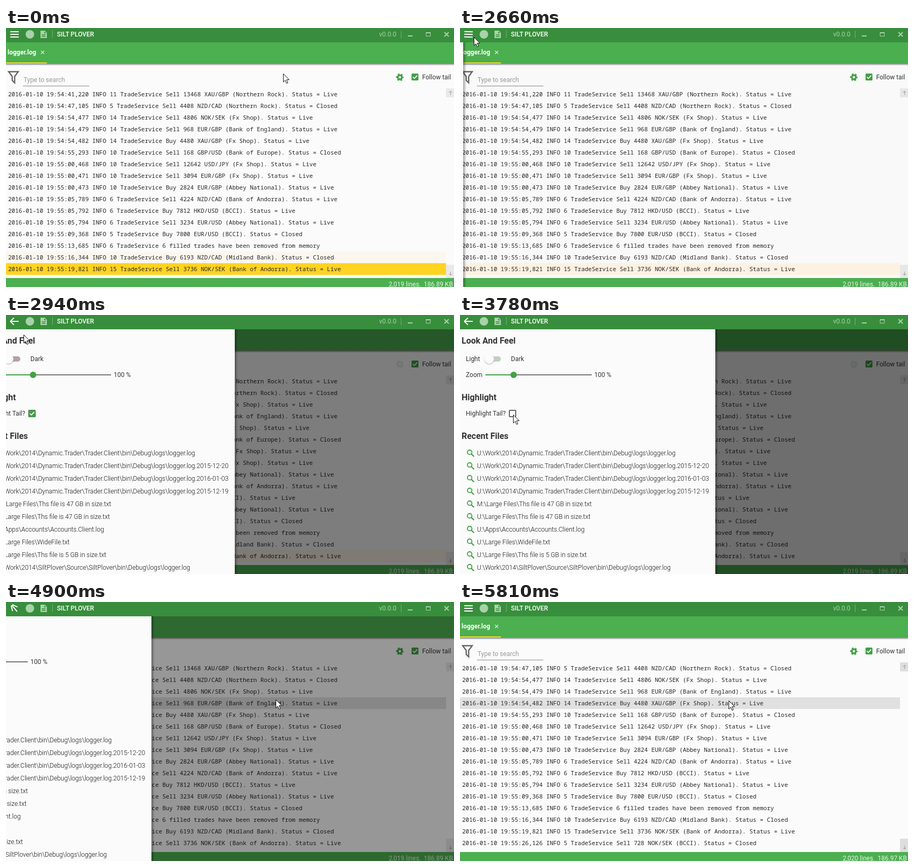
Recreate the animation shown at these times as an HTML page. Size 844 px wide and 489 px high, loop 8000 ms.

```html
<!DOCTYPE html>
<html lang="en">
<head>
<meta charset="utf-8">
<title>Log viewer</title>
<style>
  html, body { margin: 0; width: 100%; height: 100%; overflow: hidden; background: #fafbfa; }
  svg { display: block; width: 844px; height: 489px; }
  text { font: 12px Roboto, sans-serif; fill: #333; white-space: pre; }
  .log text { font: 11px "Noto Sans Mono", monospace; fill: #262626; }
  .head { font-weight: 700; font-size: 16px; }
  .file { font-weight: 300; fill: #111; }
  .pale { fill: #a8d3aa; }
  .line { fill: none; stroke: #a8d3aa; stroke-width: 2; }
</style>
</head>
<body>
<svg viewBox="0 0 844 489">
  <defs>
    <linearGradient id="down" x2="0" y2="1">
      <stop stop-opacity=".5"/><stop offset="1" stop-opacity="0"/>
    </linearGradient>
    <linearGradient id="side">
      <stop stop-opacity=".35"/><stop offset="1" stop-opacity="0"/>
    </linearGradient>
    <g id="tick">
      <rect width="13" height="13" rx="1.5" fill="#43a047"/>
      <path d="M2.5 6.5L5.3 9.3L10.7 3.7" fill="none" stroke="#fff" stroke-width="1.7"/>
    </g>
    <g id="lens" fill="none" stroke="#43a047">
      <circle cx="-1.8" cy="-1.8" r="4.2" stroke-width="1.8"/>
      <path d="M1.5 1.5L6.3 6.3" stroke-width="2.3"/>
    </g>
  </defs>

  <rect width="844" height="489" fill="#fafbfa"/>
  <rect y="27" width="844" height="40" fill="#4caf50"/>
  <rect y="67" width="844" height="4" fill="url(#down)"/>
  <rect y="65" width="77" height="2" fill="#ffd92e"/>
  <text x="3" y="50" style="font-weight:700;fill:#fff">logger.log</text>
  <path d="M66 43L72 49M72 43L66 49" stroke="#d6edd7" stroke-width="1.4"/>

  <path d="M5 82.5H23L16.3 91.5V103.5L11.7 99V91.5Z" fill="none" stroke="#666" stroke-width="2.4"/>
  <text x="33" y="102" style="fill:#999">Type to search</text>
  <path d="M32 109.5H157" stroke="#888"/>
  <g id="gear" transform="translate(742 93)" fill="none" stroke="#43a047">
    <circle r="3.9" stroke-width="3.2"/>
    <circle r="6" stroke-width="2.4" stroke-dasharray="3.1416" stroke-dashoffset="1.57"/>
  </g>
  <use href="#tick" x="764" y="86"/>
  <text x="784" y="97">Follow tail</text>

  <rect id="older" y="422" width="829" height="22"/>
  <rect id="tail" y="444" width="829" height="22"/>
  <rect id="hover" y="180" width="829" height="22" fill="#e0e0e0"/>
  <g class="log" id="log"></g>

  <g id="bar" fill="#e9e9e9">
    <path d="M829 114h15v17h-15zM829 447h15v25h-15z"/>
    <path d="M837.5 126.500V119M834.500 122L837.500 119L840.500 122M837.500 460V467M834.500 464L837.500 467L840.500 464" fill="none" stroke="#9a9a9a"/>
  </g>
  <rect y="472" width="844" height="17" fill="#4caf50"/>
  <text id="lines" x="721" y="488" style="fill:#e8f5e9"></text>
  <text id="size" x="787" y="488" style="fill:#e8f5e9"></text>

  <rect id="scrim" y="27" width="844" height="462"/>
  <g id="drawer">
    <rect x="481" y="27" width="6" height="462" fill="url(#side)"/>
    <rect y="27" width="481" height="462" fill="#fafbfa"/>
    <text class="head" x="3" y="54">Look And Feel</text>
    <text x="11" y="87">Light</text>
    <rect id="track" x="46" y="78" width="31" height="10" rx="5"/>
    <circle cx="55" cy="84" r="9.500" fill="#000" opacity=".2"/>
    <circle cx="55" cy="83" r="9" fill="#fcfcfc"/>
    <text x="96" y="87">Dark</text>
    <text x="11" y="117">Zoom</text>
    <path d="M101 113H248" stroke="#777" stroke-width="2"/>
    <path d="M48 113H101" stroke="#43a047" stroke-width="2"/>
    <circle cx="101" cy="113" r="6" fill="#43a047"/>
    <text x="253" y="117">100 %</text>
    <text class="head" x="3" y="161">Highlight</text>
    <text x="11" y="190">Highlight Tail?</text>
    <rect x="93" y="180" width="12" height="12" rx="1" fill="none" stroke="#666" stroke-width="2"/>
    <use id="checked" href="#tick" x="92.500" y="179.500"/>
    <text class="head" x="3" y="234">Recent Files</text>
    <g id="files"></g>
  </g>

  <rect width="844" height="27" fill="#388e3c"/>
  <g id="burger" fill="none" stroke="#fff" stroke-width="2">
    <path d="M-8 0H8"/><path id="upper"/><path id="lower"/>
  </g>
  <circle class="pale" cx="45" cy="12" r="8"/>
  <path class="pale" fill-rule="evenodd" d="M65 5H73L77 9V19H65ZM72 6.500V10H76ZM67.500 12V13.500H74.500V12ZM67.500 15V16.500H74.500V15Z"/>
  <path d="M87.500 4V19M744.500 5V19" stroke="#73b276"/>
  <text x="96" y="16" style="font-weight:500;fill:#fff">SILT PLOVER</text>
  <text class="pale" x="703" y="16">v0.0.0</text>
  <path class="line" d="M757 15H766M791 9H800M826 8L834 16M834 8L826 16"/>
  <path class="line" d="M791.500 8.500H799.500V15.500H791.500Z" style="stroke-width:1"/>
  <path id="cursor" d="M.5 .5V16L4 12.700L6.500 18.500L9 17.500L6.500 11.700H11.500Z" fill="#fff" stroke="#111"/>
</svg>
<script>
const $ = id => document.getElementById(id);
const set = (id, attrs) => { for (const k in attrs) $(id).setAttribute(k, attrs[k]); };

const LOOP = 8000, STEP = 70;
const OPEN = 2657, CLOSE = 4787, SLIDE = 400, UNCHECK = 3780, APPEND = 5600;

const rows = `19:54:41,220 INFO 11 TradeService Sell 13468 XAU/GBP (Northern Rock). Status = Live
19:54:47,105 INFO 5 TradeService Sell 4408 NZD/CAD (Northern Rock). Status = Closed
19:54:54,477 INFO 14 TradeService Sell 4806 NOK/SEK (Fx Shop). Status = Live
19:54:54,479 INFO 14 TradeService Sell 968 EUR/GBP (Bank of England). Status = Live
19:54:54,482 INFO 14 TradeService Buy 4480 XAU/GBP (Fx Shop). Status = Live
19:54:55,293 INFO 10 TradeService Sell 168 GBP/USD (Bank of Europe). Status = Closed
19:55:00,468 INFO 10 TradeService Sell 12642 USD/JPY (Fx Shop). Status = Live
19:55:00,471 INFO 10 TradeService Sell 3094 EUR/GBP (Fx Shop). Status = Live
19:55:00,473 INFO 10 TradeService Buy 2824 EUR/GBP (Abbey National). Status = Live
19:55:05,789 INFO 6 TradeService Sell 4224 NZD/CAD (Bank of Andorra). Status = Live
19:55:05,792 INFO 6 TradeService Buy 7812 HKD/USD (BCCI). Status = Live
19:55:05,794 INFO 6 TradeService Sell 3234 EUR/USD (Abbey National). Status = Live
19:55:09,368 INFO 5 TradeService Buy 7800 EUR/USD (BCCI). Status = Closed
19:55:13,685 INFO 6 TradeService 6 filled trades have been removed from memory
19:55:16,344 INFO 10 TradeService Buy 6193 NZD/CAD (Midland Bank). Status = Closed
19:55:19,821 INFO 15 TradeService Sell 3736 NOK/SEK (Bank of Andorra). Status = Live
19:55:26,126 INFO 5 TradeService Sell 728 NOK/SEK (BCCI). Status = Closed`
  .split('\n').map(s => '2016-01-10 ' + s);

const trader = String.raw`U:\Work\2014\Dynamic.Trader\Trader.Client\bin\Debug\logs\logger.log`;
const files = [trader, trader + '.2015-12-20', trader + '.2016-01-03', trader + '.2015-12-19',
  ...String.raw`M:\Large Files\Ths file is 47 GB in size.txt
U:\Large Files\Ths file is 47 GB in size.txt
U:\Apps\Accounts\Accounts.Client.log
U:\Large Files\WideFile.txt
U:\Large Files\Ths file is 5 GB in size.txt
U:\Work\2014\SiltPlover\Source\SiltPlover\bin\Debug\logs\logger.log`.split('\n')];

$('log').innerHTML = rows.slice(1).map((_, i) => `<text x="4" y="${129 + 22 * i}"></text>`).join('');
$('files').innerHTML = files.map((f, i) =>
  `<use href="#lens" x="20" y="${261 + 24 * i}"/><text class="file" x="32" y="${265 + 24 * i}">${f}</text>`).join('');

// Keyframes are [time, ...values]
const cursorKeys = [[0, 522, 86], [840, 522, 86], [1400, 183, 69], [1680, 30, 10], [2520, 26, 17],
  [2660, 26, 17], [2940, 33, 37], [3360, 88, 190], [3640, 100, 188], [3780, 100, 188],
  [4550, 500, 179], [4690, 508, 184], [5530, 508, 184], [5600, 506, 186]];
const tailKeys = [[0, 255, 211, 34], [1400, 254, 232, 181], [2660, 255, 244, 228], [3780, 253, 249, 243]];
const olderKeys = [[0, 252, 247, 238], [840, 250, 251, 250]];

const clamp = v => Math.min(1, Math.max(0, v));
const mix = (a, b, p) => a + (b - a) * p;
const easeOut = p => Math.sin(p * Math.PI / 2);

function at(keys, t) {
  const n = keys.findIndex(k => k[0] > t);
  if (n < 0) return keys[keys.length - 1].slice(1);
  const a = keys[n - 1], b = keys[n], p = (t - a[0]) / (b[0] - a[0]);
  return a.slice(1).map((v, i) => mix(v, b[i + 1], p));
}

function drawBurger(t) {
  const closing = t >= CLOSE;
  const p = closing ? 1 - clamp((t - CLOSE) / SLIDE) : clamp((t - OPEN) / 250);
  const turn = closing ? 360 - 180 * p : 180 * p;
  const half = s => `M${mix(-8, 1, p)} ${s * mix(5, 6.5, p)}L8 ${s * mix(5, 0, p)}`;
  set('burger', { transform: `translate(16 12) rotate(${turn})` });
  set('upper', { d: half(-1) });
  set('lower', { d: half(1) });
}

function draw(t) {
  const opened = easeOut(clamp((t - OPEN) / SLIDE));
  const left = clamp((t - CLOSE) / SLIDE);
  const closing = t >= CLOSE, appended = t >= APPEND;
  const shown = closing ? 1 - easeOut(left) : opened;

  set('drawer', { transform: `translate(${Math.round(481 * (shown - 1))})`,
    visibility: shown > 0 ? 'visible' : 'hidden' });
  set('scrim', { opacity: 0.56 * (closing ? 1 - left : opened) });
  set('gear', { opacity: !closing && opened > 0.5 ? 0.15 : 1 });
  set('track', { fill: t < 3400 ? '#b3a3a3' : '#c3d0bf' });
  set('checked', { opacity: +(t < UNCHECK) });
  set('tail', { fill: `rgb(${at(tailKeys, t)})`, opacity: +(t < UNCHECK) });
  set('older', { fill: `rgb(${at(olderKeys, t)})` });
  set('hover', { opacity: +closing });
  set('bar', { fill: appended ? '#dedede' : '#e9e9e9' });
  set('cursor', { transform: `translate(${at(cursorKeys, t).map(Math.round)})` });
  drawBurger(t);

  [...$('log').children].forEach((el, i) => el.textContent = rows[i + appended]);
  $('lines').textContent = appended ? '2,020 lines.' : '2,019 lines.';
  $('size').textContent = appended ? '186.97 KB' : '186.89 KB';
}

const start = performance.now();
function tick() {
  const t = (performance.now() - start) % LOOP;
  draw(Math.floor(t / STEP) * STEP);
  requestAnimationFrame(tick);
}
tick();
</script>
</body>
</html>
```
